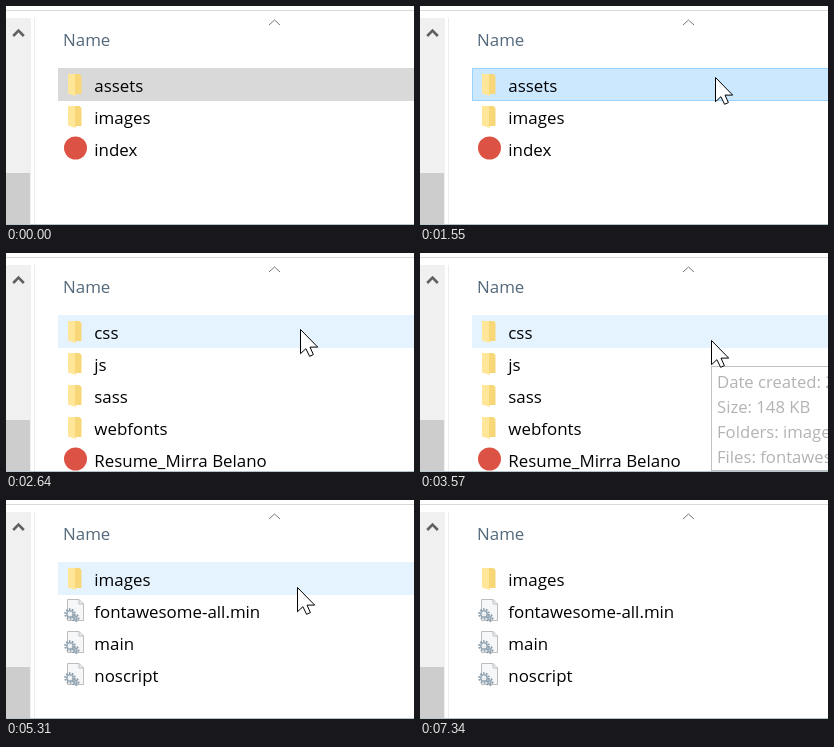
An HTML page with a canvas for the animation above (8.04 s loop, 408 px wide and 219 px high).

```html
<!DOCTYPE html>
<html lang="en">
<head>
<meta charset="utf-8">
<title>File browser</title>
<style>
html, body { margin: 0; width: 100%; height: 100%; overflow: hidden; background: #fff; }
canvas { display: block; }
</style>
</head>
<body>
<canvas id="stage" width="408" height="219"></canvas>
<script>
const ctx = document.getElementById('stage').getContext('2d');
const LOOP = 8040, ENTER = 530, LEAVE = 7340, STEP = 70;
const ROW_TOP = 62, ROW_H = 32;

// Where the pointer turns or rests
const stops = [
  { t: ENTER, x: 395, y: 100 }, { t: 740, x: 339, y: 65 },
  { t: 1020, x: 295, y: 71 }, { t: 2560, x: 295, y: 71 },
  { t: 2770, x: 291, y: 87 }, { t: 5290, x: 291, y: 87 },
  { t: 5780, x: 282, y: 159 }, { t: 5990, x: 280, y: 168 },
  { t: 6340, x: 280, y: 168 }, { t: 6550, x: 278, y: 191 },
  { t: 6900, x: 278, y: 191 }, { t: LEAVE, x: 314, y: 218 }
];
const doubleClicks = [1450, 3670], BLINK = 80;

const files = (icon, ...labels) => labels.map(label => ({ icon, label }));
const site = [...files('folder', 'assets', 'images'), ...files('page', 'index')];
const assets = [...files('folder', 'css', 'js', 'sass', 'webfonts'),
  ...files('page', 'Resume_Mirra Belano')];
const css = [...files('folder', 'images'),
  ...files('sheet', 'fontawesome-all.min', 'main', 'noscript')];
const created = 'Date created: 2/11/2019 4:20 PM';

const within = (t, a, b) => t >= a && t < b;

function pointerAt(time) {
  if (!within(time, ENTER, LEAVE)) return { x: 0, y: -99 };
  // The pointer moves in small jumps
  const t = ENTER + Math.floor((time - ENTER) / STEP) * STEP;
  const i = stops.findIndex(s => s.t > t);
  const a = stops[i - 1], b = stops[i];
  const p = (t - a.t) / (b.t - a.t);
  return { x: Math.round(a.x + (b.x - a.x) * p), y: Math.round(a.y + (b.y - a.y) * p) };
}

function rect(x, y, w, h, fill, stroke) {
  ctx.fillStyle = fill;
  ctx.fillRect(x, y, w, h);
  if (!stroke) return;
  ctx.strokeStyle = stroke;
  ctx.lineWidth = 1;
  ctx.strokeRect(x + .5, y + .5, w - 1, h - 1);
}

function text(str, x, y, color = '#000', size = 16.9) {
  ctx.font = `${size}px "Open Sans", "Noto Sans", sans-serif`;
  ctx.fillStyle = color;
  ctx.fillText(str, x, y);
}

function paint(shape, fill, stroke, width = 1) {
  if (fill) { ctx.fillStyle = fill; ctx.fill(shape); }
  if (stroke) { ctx.strokeStyle = stroke; ctx.lineWidth = width; ctx.stroke(shape); }
}

const path = (d, ...style) => paint(new Path2D(d), ...style);

function circle(x, y, r, ...style) {
  const shape = new Path2D();
  shape.arc(x, y, r, 0, Math.PI * 2);
  paint(shape, ...style);
}

function gear(x, y, r) {
  ctx.setLineDash([1.6, 1.4]);
  circle(x, y, r, null, '#8b9dab', 2);
  ctx.setLineDash([]);
  circle(x, y, r - 1.6, '#eef2f5', '#9aabb8', 1.6);
}

const icons = {
  folder() {
    path('M62 6H70V28L62 25.5Z', '#ffe698');
    path('M69 6H73.5L75.5 8V26H69Z', '#f8d778');
  },
  page() { circle(69.5, 16, 11.5, '#dc5244'); },
  sheet() {
    path('M61.5 5.5H73L77.5 10V26.5H61.5Z', '#f6f7f8', '#bcbcbc');
    path('M73 5.5V10H77.5', null, '#bcbcbc');
    gear(64, 20, 4.8);
    gear(69.5, 24, 3);
  }
};

function list(items, hover, selected = -1, idle = -1) {
  items.forEach(({ icon, label }, i) => {
    ctx.save();
    ctx.translate(0, ROW_TOP + i * ROW_H);
    if (i === selected) rect(52, 0, 360, ROW_H + 1, '#cce8ff', '#99d1ff');
    else if (i === hover) rect(52, 0, 360, ROW_H + 1, '#e5f3ff');
    else if (i === idle) rect(52, 0, 360, ROW_H + 1, '#d9d9d9');
    icons[icon]();
    text(label, 88.3, 24);
    ctx.restore();
  });
}

function tooltip(alpha, ...lines) {
  ctx.globalAlpha = alpha;
  rect(291, 113, 120, 25 * lines.length + 5, '#fff', '#767676');
  lines.forEach((line, i) => text(line, 297, 135 + 25 * i, '#575757', 16.7));
  ctx.globalAlpha = 1;
}

function frameParts(header) {
  rect(0, 4, 408, 1, '#d9d9d9');
  rect(0, 12, 25, 207, '#f0f0f0');
  rect(0, 167, 24, 52, '#cdcdcd');
  rect(28, 12, 1, 207, '#ececec');
  path('M7.2 30L12.5 24.7L17.8 30', null, '#606060', 2.6);
  if (!header) return;
  path('M263 19L268.5 14L274 19', null, '#777');
  text('Name', 57, 40, '#54697b');
}

function pointer({ x, y }, busy) {
  if (busy) circle(x + 22, y, 8.8, '#fff', '#3799ea', 4.4);
  ctx.save();
  ctx.translate(x + .5, y + .5);
  path('M0 0V24.2L5.4 19.2L9.1 26.8L12.9 25.1L9.5 17.6H17.2Z', '#fff', '#000');
  ctx.restore();
}

function draw(t) {
  const tip = pointerAt(t);
  const hover = Math.floor((tip.y - ROW_TOP) / ROW_H);
  const blank = within(t, 4350, 4420);
  const working = within(t, 2170, 2320) || within(t, 4420, 4490);
  const clicking = doubleClicks.some(c =>
    within(t, c, c + 3 * BLINK) && Math.floor((t - c) / BLINK) !== 1);

  rect(0, 0, 408, 219, '#fff');
  frameParts(!blank);
  if (working) text('Working on it...', 329, 96, '#6d6d6d');
  else if (t < 2170) list(site, hover, hover === 0 ? 0 : -1, 0);
  else if (t < 4350) list(assets, hover, t >= 3670 ? 0 : -1);
  else if (!blank) list(css, t < 5000 ? -1 : hover);

  if (within(t, 3570, 3670))
    tooltip(.45, created, 'Size: 148 KB', 'Folders: images', 'Files: fontawesome-all.min');
  if (within(t, 5000, 5310))
    tooltip(1, created, 'Size: 3.17 KB', 'Files: overlay');

  rect(0, 218, 408, 1, '#b3c6cb');
  if (clicking) circle(tip.x, tip.y, 18, 'rgba(255,255,0,.47)');
  pointer(tip, within(t, 2240, 2480) || within(t, 4350, 4830));
}

const start = performance.now();
function frame() {
  draw((performance.now() - start) % LOOP);
  requestAnimationFrame(frame);
}
frame();
</script>
</body>
</html>
```
